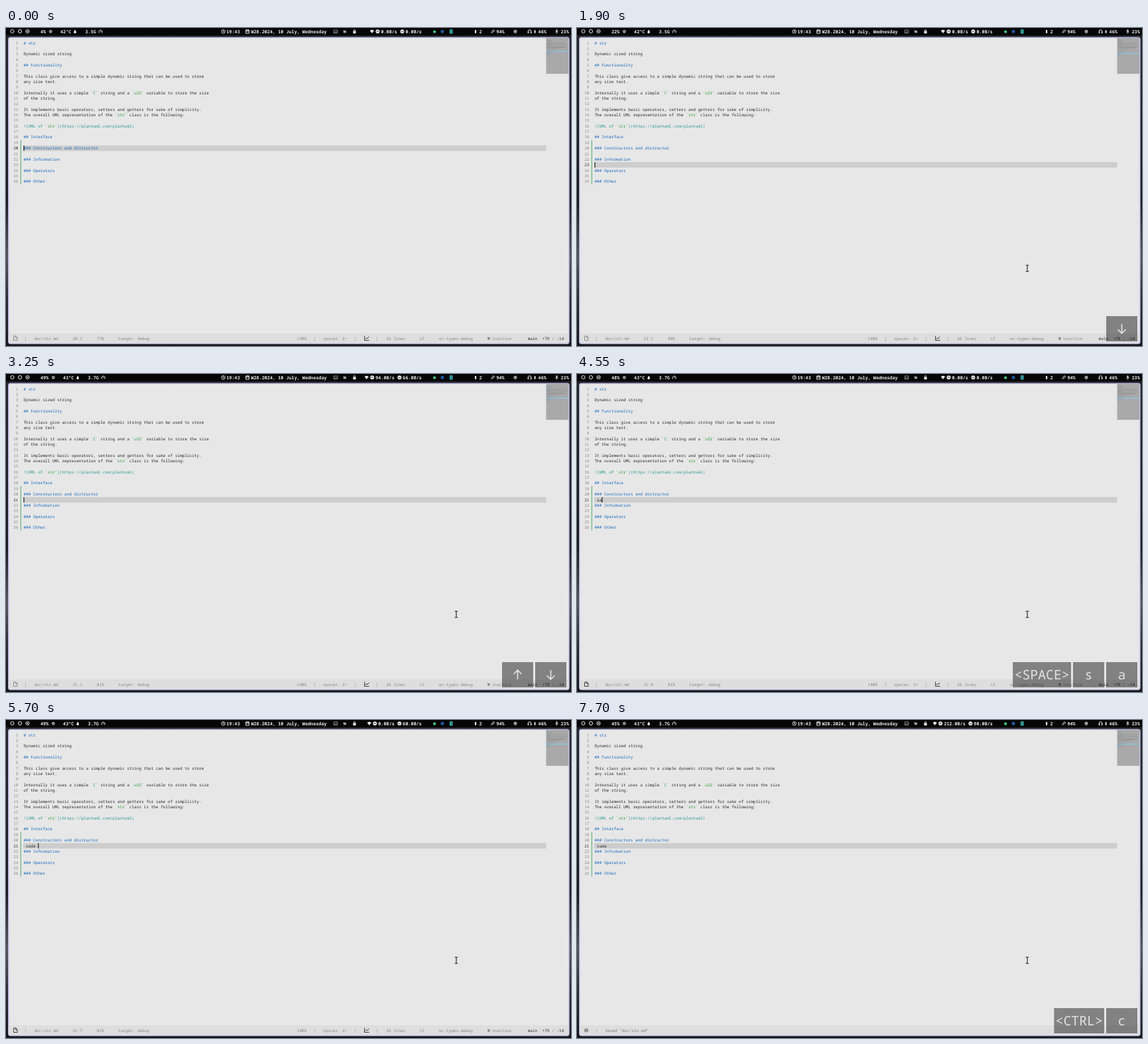
An HTML page for the animation above (8 s loop, 852x479 px).

```html
<!DOCTYPE html>
<html lang="en">
<head>
<meta charset="utf-8">
<title>Editor session</title>
<style>
  html, body { margin: 0; width: 100%; height: 100%; overflow: hidden; background: #161618; }
  svg { display: block; width: 852px; height: 479px; }
  text {
    font-family: "Noto Sans Mono", "DejaVu Sans Mono", monospace;
    font-size: 6.05px; white-space: pre; text-rendering: geometricPrecision;
  }
  .bar text { font-size: 6.81px; font-weight: 700; fill: #e8e8e8; }
  .keys text { font-size: 19.8px; fill: #e2e2e2; }
  .line { fill: none; stroke: #e8e8e8; stroke-width: 1; }
</style>
</head>
<body>
<svg viewBox="0 0 852 479">
  <defs>
    <linearGradient id="wall" x2="0" y2="1">
      <stop offset="0" stop-color="#242428"/><stop offset=".55" stop-color="#1b1b1e"/>
      <stop offset=".72" stop-color="#55555a"/><stop offset=".85" stop-color="#2c2c30"/>
      <stop offset="1" stop-color="#161618"/>
    </linearGradient>
    <clipPath id="statusClip"><rect x="4" y="460" width="845" height="15"/></clipPath>
  </defs>
  <rect width="852" height="479" fill="url(#wall)"/>
  <rect width="852" height="11" fill="#060607"/>
  <rect x="3.7" y="14.2" width="845.4" height="461.3" rx="3" fill="#e7e7e7" stroke="#b4b2e2" stroke-width="1.3"/>
  <rect x="4.4" y="460" width="844" height="14.8" rx="2" fill="#dedede"/>
  <g id="stage"></g>
</svg>
<script>
const LOOP = 8000, CELL = 3.63, ROW = 8.34, TEXT_X = 26.4, BAR_CELL = 4.09;
const BLUE = '#1767bd', GREEN = '#2f9a38', TEAL = '#27988f', INK = '#2b2b2b', DIM = '#858585';

const DOC = [
  '# str', '', 'Dynamic sized string', '', '## Functionality', '',
  'This class give access to a simple dynamic string that can be used to store',
  'any size text.', '',
  'Internally it uses a simple `C` string and a `u32` variable to store the size',
  'of the string.', '',
  'It implements basic operators, setters and getters for sake of simplicity.',
  'The overall UML representation of the `str` class is the following:', '',
  '![UML of `str`](https://plantuml.com/plantuml)', '',
  '## Interface', '', '### Constructors and distructor', '',
  '### Information', '', '### Operators', '', '### Other'
];

// [time, key, lifetime on screen]
const PRESSES = [
  [1550, '↓'], [1750, '↓'], [1900, '↓'],
  [2550, '↑'], [2700, '↑'], [2900, '↑'], [3200, '↓', 650],
  [4250, '<SPACE>'], [4400, 's'], [4550, 'a'], [4600, 'd'], [4750, 'a'], [4850, '<SPACE>'],
  [6250, '<CTRL>', LOOP], [6400, 'c', LOOP]
];
const SAVE_AT = 6400;

// [time, cpu, temperature, memory]
const SYSTEM = [
  [0, 4, 42, 3.5], [200, 18, 42, 3.5], [1200, 22, 42, 3.5], [2200, 21, 42, 3.5],
  [3200, 49, 43, 3.7], [4200, 48, 43, 3.7], [5200, 49, 43, 3.7], [6250, 47, 43, 3.7], [7200, 45, 43, 3.7]
];
// [time, up, down]
const NETWORK = [[0, 0, 0], [3050, 94, 66], [4050, 0, 0], [5000, 0, 60], [6050, 0, 0], [6950, 212, 90]];

const at = (table, t) => table.filter(row => row[0] <= t).pop();
const esc = s => s.replace(/&/g, '&amp;').replace(/</g, '&lt;');
const text = (x, y, s, fill = '', anchor = 'start') =>
  `<text x="${x}" y="${y}" text-anchor="${anchor}"${fill && ` fill="${fill}"`}>${esc(s)}</text>`;
const rect = (x, y, w, h, fill, rx = 0) =>
  `<rect x="${x}" y="${y}" width="${w}" height="${h}" fill="${fill}" rx="${rx}"/>`;
const dot = (x, y, r, fill = '#e8e8e8') => `<circle cx="${x}" cy="${y}" r="${r}" fill="${fill}"/>`;
const ring = (x, y, r) => `<circle cx="${x}" cy="${y}" r="${r}" class="line"/>`;
const path = (d, attrs = 'class="line"') => `<path d="${d}" ${attrs}/>`;

function editorState(t) {
  let line = 20, typed = '', lastEdit = -400;
  const keys = [];
  for (const [time, key, life = 600] of PRESSES) {
    if (time > t) break;
    const shown = keys.find(k => k.key === key && k.end > time);
    if (shown) shown.end = time + life;
    else keys.push({ key, end: time + life });
    if (time >= 6000) continue;
    lastEdit = time;
    if (key === '↓') line++;
    else if (key === '↑') line--;
    else typed += key === '<SPACE>' ? ' ' : key;
  }
  const blink = Math.floor((t - lastEdit - 50) / 400) % 2;
  return { line, typed, keys: keys.filter(k => k.end > t), caret: blink <= 0 };
}

function codeLine(s, y) {
  if (s[0] === '#') return text(TEXT_X, y, s, BLUE);
  const base = s[0] === '!' ? TEAL : INK;
  const spans = esc(s).replace(/`\w+`/g, m => `<tspan fill="${GREEN}">${m}</tspan>`);
  return `<text x="${TEXT_X}" y="${y}" fill="${base}">${spans}</text>`;
}

function minimap(line) {
  let out = rect(814.5, 15, 33.8, 54, '#a9a9a9') + rect(814.5, 16.4 + (line - 1) * .96, 33.8, 1.5, '#8bc5df');
  DOC.forEach((s, i) => {
    if (s) out += rect(815.5, 16.8 + i * .96, s.length * .39, .55, s[0] === '#' ? '#7f90a4' : '#858585');
  });
  return out;
}

function editor({ line, typed, caret }) {
  let out = rect(26, 18.5 + (line - 1) * ROW, 788.5, ROW, '#cdcdcd');
  DOC.forEach((s, i) => {
    const y = 24.7 + i * ROW;
    out += text(18.4, y, String(i + 1), i + 1 === line ? INK : '#8b8b8b', 'end');
    out += codeLine(i === 20 ? typed : s, y);
  });
  out += rect(21.8, 169, 1.1, 66.6, '#58b070');
  if (caret) out += rect(TEXT_X + typed.length * CELL, 18.7 + (line - 1) * ROW, 1.2, 8, '#222');
  return out + minimap(line);
}

function statusItems({ line, typed }) {
  const y = 469.5, edited = typed ? INK : DIM;
  const items = [
    [42.4, 'doc/str.md'], [100.4, `${line}:${typed.length + 1}`], [137, Math.round(line / 26 * 100) + '%'],
    [169.3, 'target: debug'], [438.5, '140%'], [463.4, '|'], [478, 'spaces: 2+'], [525, '|'], [557.6, '|'],
    [573.3, '26 lines'], [624, 'LF'], [653, 'ec-types-debug'], [733, 'inactive'],
    [786.7, 'main', INK], [808.5, '+79', INK], [823.3, '/'], [830.4, '-14', INK]
  ];
  return items.map(([x, s, fill = DIM]) => text(x, y, s, fill)).join('') + text(27.8, y, '|', DIM) +
    path('M11.5 464h3.3l2.2 2.2v4.3h-5.5zM14.6 464v2.4h2.4', `fill="none" stroke="${edited}" stroke-width=".9"`) +
    path('M540.6 463.6v6.8h7M541.8 468.6l1.8-2 1.4 1.2 2.2-3', `fill="none" stroke="${INK}" stroke-width=".9"`) +
    rect(726.3, 465.8, 3.2, 3.8, DIM);
}

function savedMessage() {
  return dot(14, 467.5, 3, DIM) + rect(13.6, 465.5, .8, .9, '#eee') + rect(13.6, 467, .8, 2.3, '#eee') +
    text(27.8, 469.5, '|', DIM) + text(42.4, 469.5, 'Saved "doc/str.md"', '#777');
}

function status(state, t) {
  const p = Math.min(1, Math.max(0, (t - SAVE_AT) / 200));
  const shift = 32 * (1 - (1 - p) ** 3);
  return `<g clip-path="url(#statusClip)">` +
    (p < 1 ? `<g transform="translate(0 ${-shift})">${statusItems(state)}</g>` : '') +
    (p > 0 ? `<g transform="translate(0 ${32 - shift})">${savedMessage()}</g>` : '') + '</g>';
}

function network(t) {
  const [, up, down] = at(NETWORK, t).map(v => v.toFixed(1) + 'B/s');
  const downX = 627 - down.length * BAR_CELL, upX = downX - 12.5 - up.length * BAR_CELL;
  const arrow = (x, dir) => dot(x, 5.3, 3) +
    path(`M${x - 1.5} ${5.3 + dir * .6}l1.5 ${-dir * 1.5}l1.5 ${dir * 1.5}`, 'fill="none" stroke="#060607" stroke-width=".9"');
  return path(`M${upX - 16.6} 4q3.1-2.6 6.2 0l-3.1 4z`, 'fill="#e8e8e8"') +
    arrow(upX - 5, 1) + text(upX, 7.8, up) + arrow(downX - 5, -1) + text(downX, 7.8, down);
}

function topBar(t) {
  const [, cpu, temp, mem] = at(SYSTEM, t);
  const dx = cpu > 9 ? BAR_CELL : 0;
  const label = (x, s) => text(x, 7.8, s);
  return '<g class="bar">' +
    ring(9.5, 5, 2.6) + ring(21, 5, 2.6) + ring(32.5, 5, 2.6) + dot(32.5, 5, 1.1) + label(52, cpu + '%') +
    `<g transform="translate(${dx} 0)">` +
    ring(67.3, 5.3, 1.9) + dot(67.3, 5.3, .8) +
    label(82, temp + '°C') + path('M104 2.6q2.5 3 1.8 4.6q-1.8 1.8-3.6 0q-.4-1.4 1.8-4.6z', 'fill="#e8e8e8"') +
    label(119.5, mem.toFixed(1) + 'G') + path('M140.6 7.5a2.6 2.6 0 1 1 4 0M142.5 6l1.2-1.5') + '</g>' +
    ring(327.7, 5.3, 2.7) + path('M327.7 3.6v1.8h1.4') + label(332.4, '19:43') +
    path('M361.7 3h4.8v5h-4.8zM361.7 4.8h4.8M363 2v1.5M365.2 2v1.5') + label(369.4, 'W28.2024, 10 July, Wednesday') +
    path('M494.3 3h5.6v4.6h-5.6zM495 7l1.7-1.8 1.2 1 1-1', 'fill="none" stroke="#aaa" stroke-width=".8"') +
    rect(508.8, 3.7, 4.2, 3.5, '#aaa', .6) + path('M508.5 2.8l5 5', 'stroke="#777" stroke-width=".7"') +
    rect(523.4, 4.8, 4.2, 3.4, '#e8e8e8', .5) + path('M524.3 5v-1.2a1.2 1.2 0 0 1 2.4 0v1.2') +
    network(t) +
    dot(646.2, 5.6, 2.2, '#45c47c') + dot(658, 5.2, 2.5, '#1d5a9c') + rect(668.8, 1.8, 5, 7, '#2f938f', 1.5) +
    rect(707, 3, 2.2, 4.8, '#e8e8e8') + label(713.4, '2') +
    path('M731.4 8l2-2M732.6 5l2.6-2.4 1.4 1.4-2.4 2.6z') + label(739.4, '94%') +
    ring(768, 5.3, 2.1) + dot(768, 5.3, 1) +
    path('M787.3 6v-1a2.3 2.3 0 0 1 4.6 0v1') + rect(786.7, 5.5, 1.6, 2.6, '#e8e8e8') + rect(790.9, 5.5, 1.6, 2.6, '#e8e8e8') +
    rect(796.6, 3.3, 2, 4.4, '#e8e8e8') + label(802.6, '46%') +
    rect(829.5, 2.3, 2, 3.7, '#e8e8e8', 1) + path('M828.5 5a2 2 0 0 0 4 0M830.5 7v1.6', 'fill="none" stroke="#e8e8e8" stroke-width=".7"') +
    label(836.5, '23%') + '</g>';
}

function keyOverlay(keys) {
  let right = 845, out = '';
  for (const { key } of [...keys].reverse()) {
    const width = key.length > 1 ? key.length * 12.2 + 2.4 : 47;
    const mid = right - width / 2;
    out += rect(right - width, 434, width, 38, 'rgba(0,0,0,.44)');
    if (key === '↑' || key === '↓') {
      const dir = key === '↑' ? 1 : -1;
      out += path(`M${mid} ${453 + 7 * dir}v${-14 * dir}m-6 ${6 * dir}l6 ${-6 * dir}l6 ${6 * dir}`,
        'fill="none" stroke="#e2e2e2" stroke-width="1.7"');
    } else out += text(mid, 459.7, key, '', 'middle');
    right -= width + 3;
  }
  return `<g class="keys">${out}</g>`;
}

function pointer(t) {
  if (t < 200) return '';
  const rest = (1 - Math.min(1, (t - 200) / 250)) ** 2;
  return `<g transform="translate(${679 + 110 * rest} ${362 + 102 * rest})">` +
    path('M-2.3-4.8h1.6l.7.6.7-.6h1.6M0-4.2v8.4M-2.3 4.8h1.6l.7-.6.7.6h1.6', 'fill="none" stroke="#1c1c1c" stroke-width="1.1"') + '</g>';
}

const stage = document.getElementById('stage');
const start = performance.now();
let drawn = '';

function frame() {
  const t = (performance.now() - start) % LOOP;
  const state = editorState(t);
  const picture = topBar(t) + editor(state) + status(state, t) + keyOverlay(state.keys) + pointer(t);
  if (picture !== drawn) stage.innerHTML = drawn = picture;
  requestAnimationFrame(frame);
}
frame();
</script>
</body>
</html>
```
